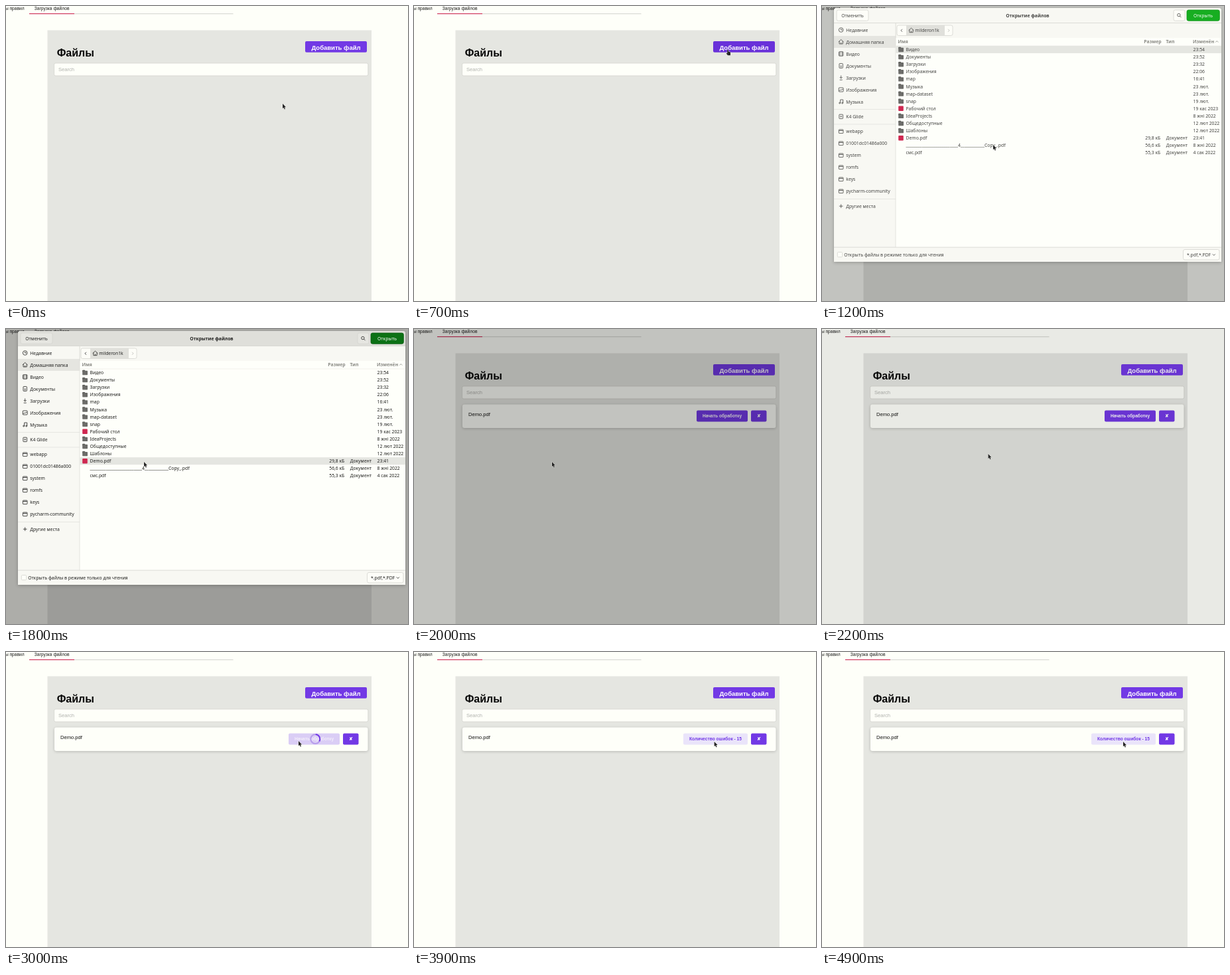
An HTML page with a canvas that plays this animation: 606 px wide and 444 px high, repeating every 5 s.

```html
<!DOCTYPE html>
<html lang="ru">
<head>
<meta charset="utf-8">
<title>Загрузка файлов</title>
<style>
html, body { margin: 0; width: 100%; height: 100%; overflow: hidden; background: #fefff9; }
canvas { display: block; }
</style>
</head>
<body>
<canvas id="stage" width="606" height="444"></canvas>
<script>
const ctx = document.getElementById('stage').getContext('2d');
const W = 606, H = 444, LOOP = 5000, STEP = 100;
const PAGE = '"Liberation Sans", Arial, sans-serif';
const UI = '"Noto Sans", "Open Sans", sans-serif';
const PAPER = '#fefff9', PURPLE = '#7239e5', BAR = '#f8f8f3', EDGE = '#d5d5d0';
let ink;

// each move starts where the previous one ended
const REST = { x: 417, y: 147 };
const MOVES = [
  { from: 0, to: 700, x: 473, y: 66 },
  { from: 800, to: 1200, x: 258, y: 209 },
  { from: 1200, to: 1600, x: 208, y: 200 },
  { from: 2050, to: 2600, x: 441, y: 134 },
  { from: 3100, to: 4100, x: 454, y: 135 }
];

const SIDE = [
  [['clock', 'Недавние'], ['home', 'Домашняя папка'], ['film', 'Видео'], ['doc', 'Документы'],
    ['down', 'Загрузки'], ['image', 'Изображения'], ['note', 'Музыка']],
  [['drive', 'K4 Glide']],
  ['webapp', '01001dc01486a000', 'system', 'romfs', 'keys', 'pycharm-community'].map(s => ['folder', s]),
  [['plus', 'Другие места']]
];
const FILES = [
  ['Видео', '23:54'], ['Документы', '23:52'], ['Загрузки', '23:32'], ['Изображения', '22:06'],
  ['map', '16:41'], ['Музыка', '23 лют.'], ['map-dataset', '23 лют.'], ['snap', '19 лют.'],
  ['Рабочий стол', '19 кас 2023'], ['IdeaProjects', '8 жні 2022'],
  ['Общедоступные', '12 лют 2022'], ['Шаблоны', '12 лют 2022'],
  ['Demo.pdf', '23:41', '29,8 кБ'],
  ['_'.repeat(26) + '4' + '_'.repeat(12) + 'Copy_.pdf', '8 жні 2022', '56,6 кБ'],
  ['смс.pdf', '4 сак 2022', '55,3 кБ']
];

function ramp(t, from, to) {
  const k = Math.max(0, Math.min(1, (t - from) / (to - from)));
  return k * k * (3 - 2 * k);
}

function pointerAt(t) {
  return MOVES.reduce((p, m) => {
    const k = ramp(t, m.from, m.to);
    return { x: p.x + (m.x - p.x) * k, y: p.y + (m.y - p.y) * k };
  }, REST);
}

function rect(x, y, w, h, fill) {
  ctx.fillStyle = fill;
  ctx.fillRect(x, y, w, h);
}

function stroke(color, width = 0.8) {
  ctx.strokeStyle = color;
  ctx.lineWidth = width;
  ctx.stroke();
}

function box(x, y, w, h, r, fill, border) {
  ctx.beginPath();
  ctx.roundRect(x, y, w, h, r);
  if (fill) { ctx.fillStyle = fill; ctx.fill(); }
  if (border) stroke(border);
}

function shadowBox(x, y, w, h, r, fill, alpha, blur) {
  ctx.save();
  ctx.shadowColor = `rgba(0,0,0,${alpha})`;
  ctx.shadowBlur = blur;
  ctx.shadowOffsetY = 1;
  box(x, y, w, h, r, fill);
  ctx.restore();
}

function text(s, x, y, font, color, align = 'left') {
  ctx.font = font;
  ctx.fillStyle = color;
  ctx.textAlign = align;
  ctx.fillText(s, x, y);
}

function label(s, x, y, color = ink, align = 'left', weight = '') {
  text(s, x, y + 2.5, `${weight} 6.8px ${UI}`, color, align);
}

function line(color, ...points) {
  ctx.beginPath();
  points.forEach(p => ctx.lineTo(...p));
  stroke(color);
}

function arc(x, y, r, color, width = 0.8, from = 0, to = Math.PI * 2) {
  ctx.beginPath();
  ctx.arc(x, y, r, from, to);
  stroke(color, width);
}

// chevron pointing along dx, dy
function chevron(x, y, dx, dy, color = ink) {
  line(color, [x - dx - dy * 2, y - dy - dx * 2], [x + dx, y + dy], [x - dx + dy * 2, y - dy + dx * 2]);
}

// small outline icons centred on the origin
const frame = (c, w, h) => box(-w, -h, 2 * w, 2 * h, 0.7, null, c);
const ICONS = {
  clock(c) { arc(0, 0, 3.3, c); line(c, [0, -2], [0, 0], [2, 0]); },
  home(c) {
    line(c, [-3.8, 0], [0, -3.5], [3.8, 0]);
    line(c, [-2.6, -1], [-2.6, 3], [2.6, 3], [2.6, -1]);
    line(c, [0, 3], [0, 1]);
  },
  film(c) {
    frame(c, 3.2, 3.2);
    for (const x of [-1.6, 1.6]) line(c, [x, -3], [x, 3]);
  },
  doc(c) {
    frame(c, 2.7, 3.4);
    for (const y of [0, 1.6]) line(c, [-1, y], [1, y]);
  },
  down(c) { line(c, [0, -3.4], [0, 1]); chevron(0, 0, 0, 1, c); line(c, [-2, 3.2], [2, 3.2]); },
  image(c) { frame(c, 3.4, 3); line(c, [-3, 2], [-1, 0], [0, 1], [2, -1], [3, 0]); },
  note(c) {
    line(c, [-1, 2], [-1, -3], [3, -3], [3, 2]);
    for (const x of [-2, 2]) arc(x, 2, 1, c);
  },
  drive(c) { frame(c, 2.8, 3.2); arc(0, 0, 0.8, c); },
  folder(c) { frame(c, 3.3, 2.8); line(c, [-3, -1.3], [3, -1.3]); },
  plus(c) { line(c, [-2.8, 0], [2.8, 0]); line(c, [0, -2.8], [0, 2.8]); }
};

function icon(name, x, y) {
  ctx.save();
  ctx.translate(x, y);
  ICONS[name](ink);
  ctx.restore();
}

function button(x, y, w, h, caption, size, fill = PURPLE, color = '#fff') {
  box(x, y, w, h, 2, fill);
  text(caption, x + w / 2, y + h / 2 + size * 0.36, `bold ${size}px ${PAGE}`, color, 'center');
}

function drawCard(t) {
  shadowBox(73, 113.5, 472.5, 35.5, 3, PAPER, 0.2, 4);
  text('Demo.pdf', 82, 130.5, `7.6px ${PAGE}`, '#111');

  const y = 122.5, h = 17;
  if (t >= 3100) {
    button(406, y, 97, h, 'Количество ошибок - 15', 6.65, '#eae4fa', PURPLE);
  } else if (t >= 2700) {
    button(426, y, 77, h, 'Начать обработку', 6.65, '#dacdf5', '#f3eefb');
    const turn = (t - 3000) / 1000 * Math.PI * 2;
    arc(466.3, 131, 7, '#b79cec', 2);
    arc(466.3, 131, 7, PURPLE, 2, turn - 1.5, turn + 0.5);
  } else {
    button(426, y, 77, h, 'Начать обработку', 6.65, t >= 2500 ? '#6a33d8' : PURPLE);
  }
  button(508, y, 23.5, h, '✘', 6.65);
}

function drawPage(t) {
  rect(0, 0, W, H, PAPER);
  const tab = `6.65px ${PAGE}`;
  text('ы правил', 27.6, 5.6, tab, '#1a1a1a', 'right');
  text('Загрузка файлов', 42.7, 5.6, tab, '#1a1a1a');
  rect(103, 11.3, 239.5, 0.9, '#cdcec9');
  rect(35, 11, 68, 1.2, '#d0385f');

  rect(62.5, 36.5, 488.5, H, '#e5e6e1');
  text('Файлы', 76.7, 76, `bold 16px ${PAGE}`, '#050505');
  const hover = t >= 600 && t < 1000;
  button(451, 53, 93, 16.7, '', 9.5, hover ? '#6931d9' : PURPLE);
  text('Добавить файл', 497.5, 66, `bold 9.5px ${PAGE}`, '#fff', 'center');
  box(72.6, 86, 473.2, 19, 2.2, PAPER, '#d3d4cf');
  text('Search', 79, 98, `7.6px ${PAGE}`, '#b0b1ad');
  if (t >= 2000) drawCard(t);
}

function drawHeader(pressed) {
  const y = 14.2, fill = pressed ? '#e6e6e1' : '#fdfdf8';
  box(18, 3, 584, 22.5, [4, 4, 0, 0], pressed ? '#dfdfda' : BAR);
  rect(18, 25.2, 584, 0.8, EDGE);
  box(22, 6, 48, 16.3, 2.5, fill, EDGE);
  label('Отменить', 46, y, ink, 'center');
  label('Открытие файлов', 310, y, ink, 'center', 'bold');
  box(530, 6, 17, 16.3, 2.5, fill, EDGE);
  arc(537.9, 13.6, 2.2, ink);
  line(ink, [539.5, 15.2], [541.5, 17.2]);
  box(550, 6, 49.3, 16.3, 2.5, pressed ? '#0c7115' : '#17ae21', pressed ? '#0a5c11' : '#14951d');
  label('Открыть', 574.5, y, '#fff', 'center');
}

function drawSidebar() {
  const step = 18, gap = 4.4;
  rect(18, 45, 93, step, '#e5e5e0');
  let y = 36;
  SIDE.forEach((group, i) => {
    if (i) {
      rect(18, y - (step - gap) / 2 - gap, 93, 0.7, '#dededa');
    }
    for (const [kind, name] of group) {
      icon(kind, 28.7, y);
      label(name, 36.3, y);
      y += step;
    }
    y += gap;
  });
  rect(110.7, 26, 0.8, 337, EDGE);
}

function drawPathBar() {
  box(113, 29, 84, 15.5, 2.5, '#fdfdf8', EDGE);
  rect(127, 29, 58, 15.5, '#e0e0db');
  chevron(120, 36.8, -1, 0);
  chevron(191, 36.8, 1, 0, '#b9b9b4');
  icon('home', 134.5, 36.7);
  label('milderon1k', 140.3, 36.7);
}

function fileIcon(i, y) {
  if (i === 8 || i === 12) {
    box(115.2, y - 3.7, 7.6, 7.4, 1, '#cf2850');
  } else if (i < 12) {
    box(115.2, y - 3.7, 4, 3, 0.7, '#555552');
    box(115.2, y - 2.7, 7.8, 6.4, 0.7, '#6c6c69');
  }
}

function drawFiles(t) {
  const gray = '#8a8a85', pitch = 11.1;
  rect(111.5, 48, 490.5, 315, '#fefffa');
  rect(111.5, 59.7, 490.5, 0.6, '#e6e6e1');
  const head = (s, x, align) => label(s, x, 53.8, gray, align, 'bold');
  head('Имя', 114.5);
  head('Размер', 511.5, 'right');
  head('Тип', 518.5);
  head('Изменён', 559);
  chevron(595.3, 53.6, 0, -1, gray);

  const picked = t >= 1600 ? 12 : 0;
  FILES.forEach(([name, date, size], i) => {
    const y = 65.5 + pitch * i;
    if (i === picked) rect(111.5, y - pitch / 2, 490.5, pitch, '#e5e6e1');
    fileIcon(i, y);
    label(name, 126.5, y);
    label(date, 559.6, y);
    if (size) {
      label(size, 510.3, y, ink, 'right');
      label('Документ', 518.7, y);
    }
  });
}

function drawFooter() {
  rect(18, 362.7, 584, 0.8, EDGE);
  box(23.3, 370.5, 7.3, 7.3, 1.3, PAPER, EDGE);
  label('Открыть файлы в режиме только для чтения', 33.3, 374.1);
  box(544.5, 366.5, 54.5, 15.5, 2.5, '#fdfdf8', EDGE);
  label('*.pdf,*.PDF', 550, 374.2);
  chevron(590.8, 374.4, 0, 1);
}

function drawDialog(t) {
  ink = t >= 1500 ? '#20201f' : '#444442';
  shadowBox(18, 3, 584, 382, [4, 4, 0, 0], BAR, 0.25, 5);
  drawHeader(t >= 1800);
  drawSidebar();
  drawPathBar();
  drawFiles(t);
  drawFooter();
}

function drawPointer(t) {
  const { x, y } = pointerAt(t);
  const hand = (t >= 600 && t < 900) || (t >= 2500 && t < 2700);
  const outline = hand
    ? 'M-.7 0H.7L1 2.6 4 3.5V8.3H0L-2.6 5 -.7 5Z'
    : 'M0 0V7.2L1.6 5.8 2.7 8.4 4 8 2.8 5.4 5 5.2Z';
  const path = new Path2D(outline);
  ctx.save();
  ctx.translate(x, y);
  ctx.lineJoin = 'round';
  ctx.lineWidth = 1;
  ctx.strokeStyle = 'rgba(245,245,240,0.85)';
  ctx.stroke(path);
  ctx.fillStyle = '#262626';
  ctx.fill(path);
  ctx.restore();
}

function draw(t) {
  drawPage(t);
  const dim = 0.32 * (ramp(t, 800, 1400) - ramp(t, 1800, 2400));
  rect(0, 0, W, H, `rgba(0,0,0,${dim})`);
  if (t >= 1000 && t < 2000) drawDialog(t);
  drawPointer(t);
}

const start = performance.now();
function tick() {
  const t = (performance.now() - start) % LOOP;
  draw(Math.floor(t / STEP) * STEP);
  requestAnimationFrame(tick);
}
tick();
</script>
</body>
</html>
```
